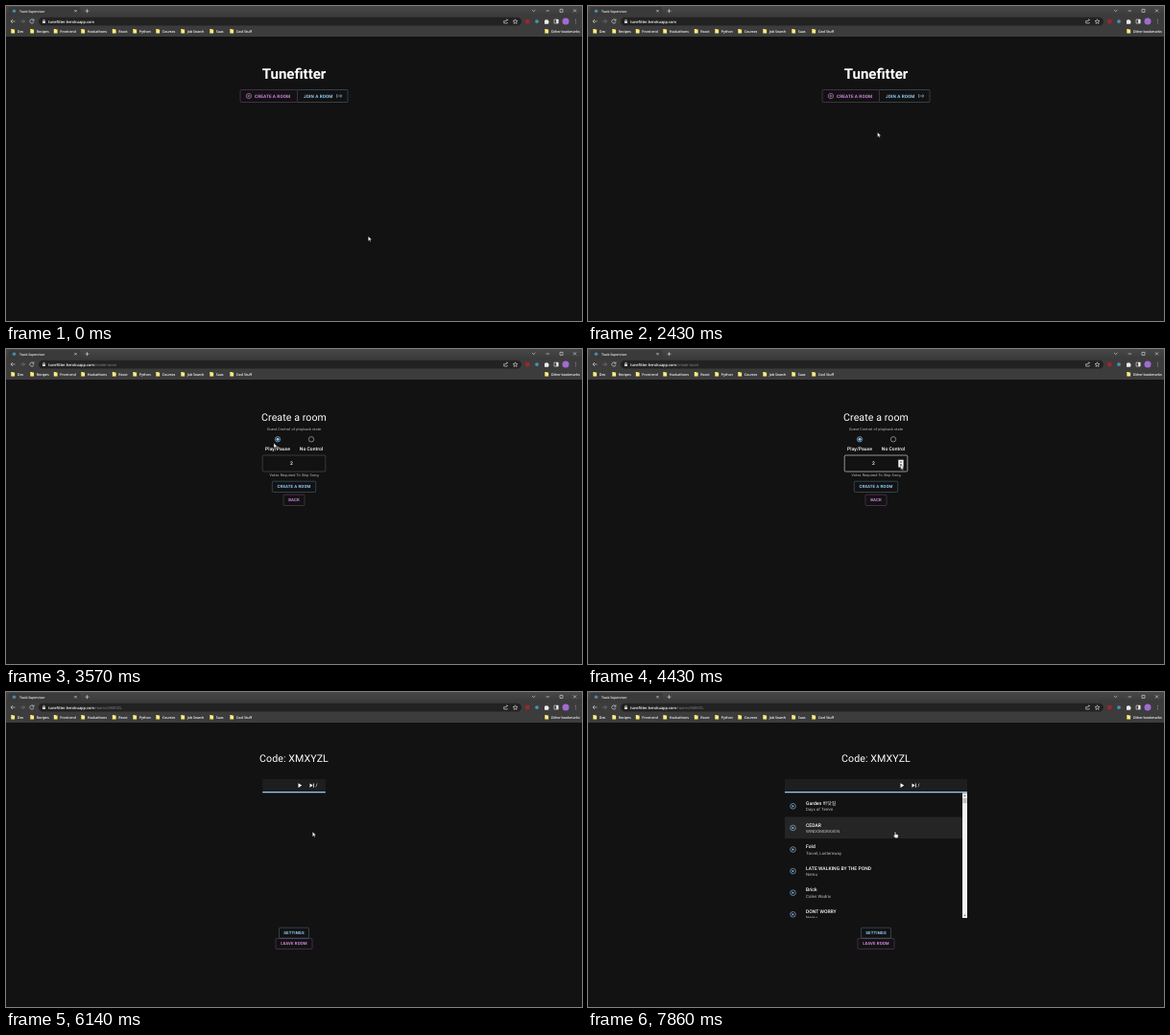
Animation, 600 px wide and 329 px high, one loop 8000 ms. Source, as an HTML page:

```html
<!DOCTYPE html>
<html lang="en">
<head>
<meta charset="utf-8">
<title>Room demo</title>
<style>
  html, body { margin: 0; width: 100%; height: 100%; overflow: hidden; background: #121212; }
  svg { display: block; width: 100%; height: 100%; }
  text { font-family: Roboto, "Noto Sans CJK KR", "Noto Sans CJK", sans-serif; fill: #fff; text-rendering: geometricPrecision; white-space: pre; }
  .ui { font-family: "Open Sans", sans-serif; fill: #f4f4f4; font-weight: 600; letter-spacing: -.03em; }
  .mid { text-anchor: middle; }
  .h { font-size: 10.62px; letter-spacing: .078px; }
  .cap { font-size: 3.75px; letter-spacing: .125px; fill: #c2c2c2; }
  .body { font-size: 5px; letter-spacing: .03px; font-weight: 500; }
  .sub { font-size: 4.375px; letter-spacing: .045px; fill: #c2c2c2; }
  .btn { font-size: 4.375px; letter-spacing: .09px; font-weight: 700; }
  .big { font-size: 4.65px; letter-spacing: .11px; font-weight: 700; }
  .line { fill: none; stroke: #e4e4e4; stroke-width: .6; }
</style>
</head>
<body>
<svg id="stage" viewBox="0 0 600 329" preserveAspectRatio="none"></svg>
<script>
const BLUE = '#90caf9', PINK = '#d283e0';
const STEP = 1000 / 7, FRAMES = 56;

const text = (x, y, s, cls, more = '') => `<text x="${x}" y="${y}" class="${cls}" ${more}>${s}</text>`;
const rect = (x, y, w, h, fill, more = '') => `<rect x="${x}" y="${y}" width="${w}" height="${h}" fill="${fill}" ${more}/>`;
const disc = (x, y, r, fill, more = '') => `<circle cx="${x}" cy="${y}" r="${r}" fill="${fill}" ${more}/>`;
const path = (d, fill, more = '') => `<path d="${d}" fill="${fill}" ${more}/>`;
const line = (d, more = '') => `<path class="line" d="${d}" ${more}/>`;
const ui = (x, y, s, size) => text(x, y, s, 'ui', `font-size="${size}"`);
const folder = x => path(`M${x + .3} 24.1h1.7l.5.5h1.6v4h-3.8z`, '#ffec7a');

// Outlined button, given as [x, y, w, h]
const outline = ([x, y, w, h], color, hover) =>
  rect(x, y, w, h, hover ? color : 'none',
    `rx="1.2" fill-opacity=".12" stroke="${color}" stroke-width=".5" stroke-opacity="${hover ? 1 : .5}"`);
const button = (box, color, label, hover) => outline(box, color, hover) +
  text(box[0] + box[2] / 2, box[1] + box[3] / 2 + 1.55, label, 'btn mid', `style="fill:${color}"`);
const ripple = ([x, y, w, h], cx, cy, r, color) =>
  `<clipPath id="press">${rect(x, y, w, h, '#000')}</clipPath>` +
  disc(cx, cy, r, color, 'fill-opacity=".3" clip-path="url(#press)"');

function browser() {
  const marks = [[5, 'Dev'], [25, 'Recipes'], [49.5, 'Front-end'], [78, 'Hackathons'], [110.5, 'React'],
    [132, 'Python'], [156, 'Courses'], [182, 'Job Search'], [212, 'Saas'], [233, 'Cool Stuff'], [561, 'Other bookmarks']];
  return '<linearGradient id="strip" x2="0" y2="1"><stop stop-color="#484848"/><stop offset="1" stop-color="#3a3a3a"/></linearGradient>' +
    rect(0, 0, 600, 32, '#3c3c3c') + rect(0, 0, 600, 10.5, 'url(#strip)') +
    path('M1 10.5Q2.5 10.5 2.5 8V3Q2.5 1 4.5 1H75.5Q77.5 1 77.5 3V8Q77.5 10.5 79 10.5Z', '#3a3a3a') +
    disc(8.5, 5.2, 1.8, '#4a8aa6') + ui(14, 6.5, 'Track Supervisor', 3.5) +
    line('M71.3 4l2.4 2.4m0-2.4l-2.4 2.4M82.5 5.2h4m-2-2v4') +
    line('M548 4l1.7 1.7L551.4 4M562.5 5h3.5M577 3.4h3v3h-3zM591 3.4l3 3m0-3l-3 3') +
    line('M9.5 16H5m2-2l-2 2 2 2') +
    line('M15 16h4.5m-2-2l2 2-2 2', 'stroke-opacity=".4"') +
    line('M28.7 14.8A2.1 2.1 0 1 0 29 16.5M29 13.5v1.7h-1.7') +
    rect(34, 11.8, 503, 8.8, '#222', 'rx="4.4"') +
    rect(38, 15.6, 3, 2.4, '#d0d0d0') + line('M38.7 15.7V15a.8.8 0 0 1 1.6 0v.7', 'stroke-width=".4"') +
    line('M519.5 15.5h-.8V18h3.5v-1M519.8 16.5q.3-2 2.7-2m-1-1l1 1-1 1') +
    line('M530.5 13.8l.7 1.6 1.7.2-1.3 1.1.4 1.7-1.5-.9-1.5.9.4-1.7-1.3-1.1 1.7-.2z', 'stroke-width=".45"') +
    rect(541.2, 14.1, 4, 4, '#a8232b') + disc(553, 16.1, 1.9, '#4a93ae') +
    path('M561 14.7h1.2a.9.9 0 0 1 1.7 0h1.2v1.2a.9.9 0 0 1 0 1.7v1.2H561z', '#eee') +
    line('M571 14.1h4.2v4H571z') + rect(573.2, 14, 2, 4, '#eee') +
    disc(583, 16.1, 3.5, '#a26bd0') +
    [14.3, 16.1, 17.9].map(y => disc(593.3, y, .45, '#eee')).join('') +
    marks.map(([x, s]) => folder(x) + ui(x + 6.8, 27.8, s, 3.7)).join('');
}

const CREATE = [244, 87.5, 59.5, 13];
const FIELD = [267.2, 111, 65.6, 17], MAKE = [277.3, 138.2, 45.4, 11.3], BACK = [289, 152.2, 22, 11.3];
const SONGS = [['Garden 바닷길', 'Days of Temm'], ['CEDAR', 'WINDOMGRAVEN'], ['Fold', 'Torvel, Lanternway'],
  ['LATE WALKING BY THE POND', 'Nemu'], ['Brick', 'Colen Wadrix'], ['DONT WORRY', 'Nemu']];

const inside = ([x, y, w, h], [px, py]) => px >= x && px <= x + w && py >= y && py <= y + h;

function home(n, at) {
  return text(300, 76.2, 'Tunefitter', 'mid', 'font-size="15" font-weight="700"') +
    path('M303.5 87.5H355q1 0 1 1v11q0 1-1 1h-51.5', 'none', `stroke="${BLUE}" stroke-width=".5" stroke-opacity=".5"`) +
    outline(CREATE, PINK, inside(CREATE, at)) +
    (n > 19 ? ripple(CREATE, 275.5, 94, n > 20 ? 20 : 8, PINK) : '') +
    text(259, 95.7, 'CREATE A ROOM', 'big', `style="fill:${PINK}"`) +
    text(310, 95.7, 'JOIN A ROOM', 'big', `style="fill:${BLUE}"`) +
    disc(252.9, 94, 2.7, 'none', `stroke="${PINK}" stroke-width=".6"`) +
    line('M251.4 94h3m-1.5-1.5v3', `style="stroke:${PINK}"`) +
    line('M344.7 92v4m1-2h4m-1.6-1.7l1.7 1.7-1.7 1.7', `style="stroke:${BLUE}"`);
}

function form(n, at) {
  const focus = n >= 33, hover = inside(FIELD, at);
  const border = focus ? BLUE : hover ? '#fff' : 'rgba(255,255,255,.3)';
  const [x, y, w, h] = FIELD;
  const spinner = rect(323.3, 115.7, 5.3, 7.8, '#f4f4f4') +
    path('M324.7 118.6l1.25-1.5 1.25 1.5zM324.7 120.6l1.25 1.5 1.25-1.5z', '#333');
  const caret = focus && Math.floor((n - 33) / 3.5) % 2 === 0 ? rect(299.2, 116.8, .4, 5.6, '#fff') : '';
  return text(300, 75, 'Create a room', 'h mid') +
    text(300, 85.3, 'Guest Control of playback state', 'cap mid') +
    disc(283, 94.3, 2.7, 'none', `stroke="${BLUE}" stroke-width=".65"`) + disc(283, 94.3, 1.5, BLUE) +
    disc(318, 94.3, 2.7, 'none', 'stroke="#c4c4c4" stroke-width=".6"') +
    text(283, 106, 'Play/Pause', 'body mid') + text(318, 106, 'No Control', 'body mid') +
    rect(x, y, w, h, 'none', `rx="1.2" stroke="${border}" stroke-width="${focus ? .8 : .55}"`) +
    text(297.5, 121.4, focus ? '1' : '2', 'body mid') + caret + (focus || hover ? spinner : '') +
    text(300, 133.3, 'Votes Required To Skip Song', 'cap mid') +
    (n > 40 ? ripple(MAKE, at[0], at[1], 18, BLUE) : '') +
    button(MAKE, BLUE, 'CREATE A ROOM', inside(MAKE, at)) + button(BACK, PINK, 'BACK');
}

function songList(hover) {
  const rows = SONGS.map(([title, artist], i) => {
    const y = 119.3 + i * 22.6;
    return disc(213.5, y, 2.8, 'none', `stroke="${BLUE}" stroke-width=".6"`) +
      path(`M212.6 ${y - 1.4}l2.2 1.4-2.2 1.4z`, BLUE) +
      text(227, y - 1.4, title, 'body') + text(227, y + 5.1, artist, 'sub');
  }).join('');
  return `<clipPath id="list">${rect(205, 105, 190, 131)}</clipPath><g clip-path="url(#list)">` +
    (hover ? rect(205, 130.5, 185, 22.6, '#252525') : '') + rows + '</g>' +
    rect(390, 105.5, 5, 130.5, '#f3f3f3') + rect(390.3, 110.8, 4.4, 5.4, '#c1c1c1') +
    path('M391.3 109l1.2-1.5 1.2 1.5zM391.3 232.8l1.2 1.5 1.2-1.5z', '#505050');
}

function room(n) {
  const open = n >= 51, half = open ? 95 : 32.8, dx = open ? 21 : 0;
  return text(300, 72.5, 'Code: XMXYZL', 'h mid') +
    rect(300 - half, 91, half * 2, 13.5, '#1e1e1e') +
    rect(300 - half, 104, half * 2, 1.3, BLUE) +
    `<g transform="translate(${dx})">` +
    path('M304.5 95.3l3.7 2.3-3.7 2.3zM316.5 95.5l3 2.1-3 2.1zM319.9 95.5h.8v4.2h-.8z', '#fff') +
    text(322.4, 99.4, '/', 'body') + '</g>' +
    (open ? songList(n >= 52) : '') +
    button([284.5, 246.2, 31, 11], BLUE, 'SETTINGS') + button([281, 257.4, 38, 11], PINK, 'LEAVE ROOM');
}

// Pointer path: frame, x, y
const MOVES = [[8, 377.3, 240.5], [11, 374, 231.7], [20, 276.2, 97], [24, 276.2, 97],
  [31, 325.7, 121], [33, 325.7, 121], [40, 319.3, 146]];

function pointer(n) {
  const i = MOVES.findIndex(m => m[0] >= n);
  if (i <= 0) return (i ? MOVES.at(-1) : MOVES[0]).slice(1);
  const [a, x0, y0] = MOVES[i - 1], [b, x1, y1] = MOVES[i];
  const u = (n - a) / (b - a), k = u * u * (3 - 2 * u);
  return [x0 + (x1 - x0) * k, y0 + (y1 - y0) * k];
}

function cursor([x, y], hand) {
  const shape = hand
    ? 'M.1.6a.6.6 0 0 1 1.2 0V2.6L3.3 3Q4 3.2 3.9 4L3.4 6.5H.8L-1.2 3.9Q-.9 3.1.1 3.8Z'
    : 'M0 0V5L1.2 3.9 2 5.7 2.8 5.3 2 3.6H3.6Z';
  return path(shape, '#fff', `transform="translate(${x} ${y})" stroke="#111" stroke-width=".35"`);
}

const stage = document.getElementById('stage'), chrome = browser();
let last = -1;

function draw(n) {
  const at = pointer(n);
  const [page, route, hand] =
    n < 22 ? [home(n, at), '', inside(CREATE, at)] :
    n < 42 ? [form(n, at), '/create-room', n < 25 || inside(MAKE, at)] :
    [room(n), '/rooms/XMXYZL', n >= 52];
  const url = `tunefitter.herokuapp.com<tspan fill="#85888c" font-weight="400">${route}</tspan>`;
  stage.innerHTML = rect(0, 0, 600, 329, '#121212') + chrome + ui(44, 17.7, url, 4.05) + page + cursor(at, hand);
}

function tick() {
  const n = Math.floor((performance.now() + 2) / STEP) % FRAMES;
  if (n !== last) draw(last = n);
  requestAnimationFrame(tick);
}
tick();
</script>
</body>
</html>
```
